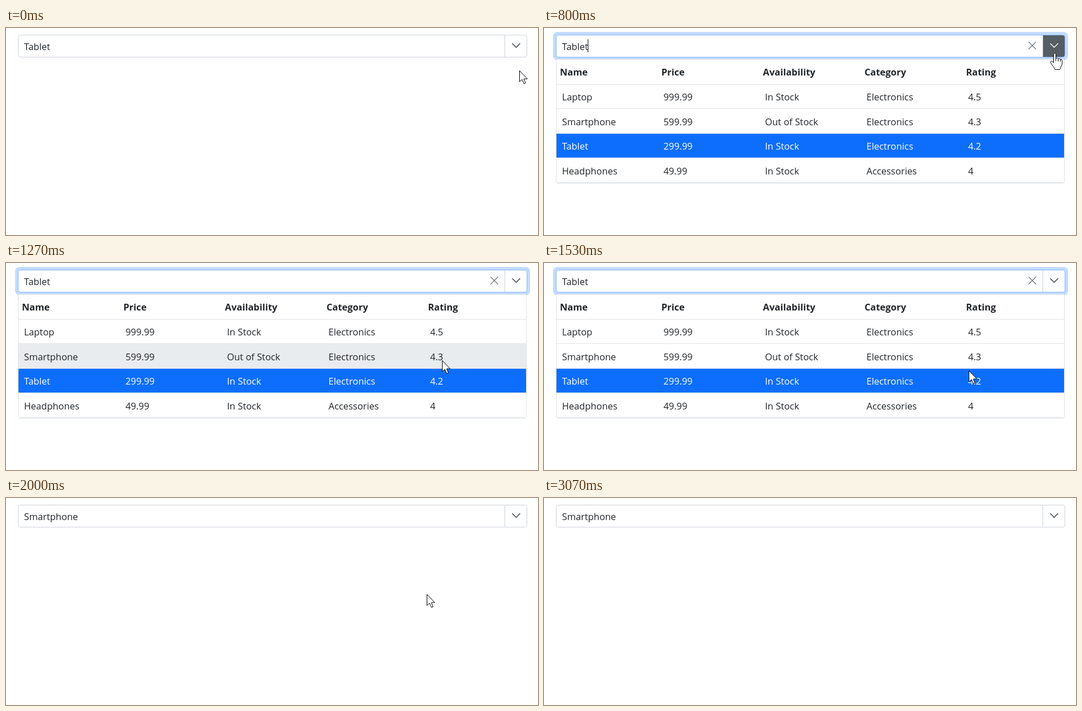
Animation, 937 px wide and 366 px high, one loop 3.87 s. Source, as an HTML page:

```html
<!DOCTYPE html>
<html lang="en">
<head>
<meta charset="utf-8">
<title>Multi-column combo box</title>
<style>
  html, body { margin: 0; width: 100%; height: 100%; overflow: hidden; background: #fff; }
  svg { display: block; width: 100%; height: 100%; }
  text { font: 16.4px "Open Sans", "Noto Sans", sans-serif; fill: #212529; }
  .head { font-weight: 700; }
  .line { fill: none; stroke: #dee2e6; }
  .icon { fill: none; stroke: #495057; stroke-width: 1.3; }
  .cursor { fill: #fff; stroke: #000; stroke-linejoin: round; }
</style>
</head>
<body>
<svg viewBox="0 0 937 366">
  <rect id="ring" x="16" y="7" width="907" height="50" rx="8" fill="#c2dbfe"/>
  <rect id="field" x="21.5" y="12.5" width="896" height="39" rx="4" fill="#fff"/>
  <path id="button" d="M879 13H914Q917 13 917 16V48Q917 51 914 51H879Z" fill="#565e64"/>
  <path class="line" d="M878.5 13V51" style="stroke:#ced4da"/>
  <path id="chevron" class="icon" d="M891.5 27.3L898.5 34.3L905.5 27.3"/>
  <path id="clear" class="icon" d="M853.5 24.5L866.5 37.5M866.5 24.5L853.5 37.5" style="stroke:#6c757d"/>
  <text id="value" x="31.7" y="39"></text>
  <rect id="caret" x="77" y="20" width="1" height="23"/>
  <g id="popup"></g>
  <path id="arrow" class="cursor" d="M.5 .5V20L5 16L8.3 23.5L11.2 22.2L8 15H14.3Z"/>
  <g id="hand" class="cursor">
    <path d="M-2.5 2Q-.5 -1 1.5 2V10Q3.5 7.5 5.5 10.5Q8 8.5 9.5 11.5Q12 10.5 12.5 13.5V19Q12.5 22 10 25V27.5Q9.5 29.5 7 29.5H1Q-1 29.5 -1 27Q-5 22 -7.5 17.5Q-8.5 14.5 -5.5 14.5Q-4 15 -2.5 17.5Z"/>
    <path d="M1.5 9V14.5M5.5 10V15M9.5 11.5V15.5" fill="none"/>
  </g>
</svg>
<script>
const LOOP = 3870, FPS = 15;
const COLUMN = 178.8, ROW_TOP = 99.5, ROW_HEIGHT = 43.6, SELECTED = 2;
const headings = ["Name", "Price", "Availability", "Category", "Rating"];
const products = [
  ["Laptop", "999.99", "In Stock", "Electronics", "4.5"],
  ["Smartphone", "599.99", "Out of Stock", "Electronics", "4.3"],
  ["Tablet", "299.99", "In Stock", "Electronics", "4.2"],
  ["Headphones", "49.99", "In Stock", "Accessories", "4"]
];
// Pointer path: tick, x, y
const path = [
  [0, 904, 75], [1, 903, 70], [2, 902, 57], [3, 900, 46], [4, 900, 44],
  [16, 900, 44], [17, 868, 72], [18, 804, 135], [19, 768, 172], [20, 751, 190],
  [22, 751, 190], [23, 748, 190], [24, 741, 170], [36, 741, 170], [37, 740, 168],
  [44, 124, 361], [45, 99, 361], [46, 99, 380]
];
const $ = id => document.getElementById(id);
const show = (id, on) => $(id).setAttribute("visibility", on ? "visible" : "hidden");
const rowY = i => Math.round(ROW_TOP + i * ROW_HEIGHT);

const cells = (labels, x, y, extra = "") => labels.map((label, i) =>
  `<text x="${x + i * COLUMN}" y="${y}" ${extra}>${label}</text>`).join("");

$("popup").innerHTML =
  `<rect class="line" x="21.5" y="55.5" width="895" height="218.5" rx="2" style="fill:#fff"/>` +
  cells(headings, 28, 84, 'class="head"') +
  products.map((product, i) => {
    const y = rowY(i), selected = i === SELECTED;
    return `<rect class="row" x="22" y="${y}" width="894" height="${rowY(i + 1) - y}"/>` +
      `<path class="line" d="M22 ${y - .5}H916"/>` +
      cells(product, 31.7, [128, 172, 215, 259][i], selected ? 'style="fill:#fff"' : "");
  }).join("") +
  `<path class="line" d="M23 273.8H915" style="stroke:#ced4da"/>`;
const rows = document.querySelectorAll(".row");

function pointerAt(tick) {
  const next = path.findIndex(key => key[0] >= tick);
  if (next < 0) return [99, 380];
  if (next === 0) return path[0].slice(1);
  const [t0, x0, y0] = path[next - 1], [t1, x1, y1] = path[next];
  let u = (tick - t0) / (t1 - t0);
  if (t1 - t0 > 4) u = u * u * (3 - 2 * u);
  return [x0 + (x1 - x0) * u, y0 + (y1 - y0) * u];
}

// Screen updates land on 15 Hz ticks rounded to 10 ms.
function tickAt(time) {
  const tick = Math.floor((time + 3.4) * FPS / 1000);
  return Math.round(tick * 100 / FPS) * 10 > time ? tick - 1 : tick;
}

function draw(tick) {
  const [x, y] = pointerAt(tick);
  const focused = tick >= 9 && tick < 30;
  const onButton = x > 878 && y < 52;
  const opacity = focused ? Math.min(1, (tick - 9) / 3) : 0;

  show("ring", focused);
  show("clear", focused);
  show("caret", focused && (tick < 19 || tick >= 27));
  show("button", onButton);
  show("hand", onButton);
  show("arrow", !onButton);
  $("field").setAttribute("stroke", focused ? "#86b7fe" : "#ced4da");
  $("chevron").style.stroke = onButton ? "#fff" : "#343a40";
  $("value").textContent = products[tick < 30 ? 2 : 1][0];
  $("popup").setAttribute("opacity", opacity);
  rows.forEach((row, i) => {
    const hovered = y >= rowY(i) && y < rowY(i + 1);
    row.setAttribute("fill", i === SELECTED ? "#0d6efd" : hovered ? "#e9ecef" : "#fff");
  });
  const place = `translate(${Math.round(x)} ${Math.round(y)})`;
  $("arrow").setAttribute("transform", place);
  $("hand").setAttribute("transform", place);
}

function frame() {
  draw(tickAt(performance.now() % LOOP));
  requestAnimationFrame(frame);
}
frame();
</script>
</body>
</html>
```
